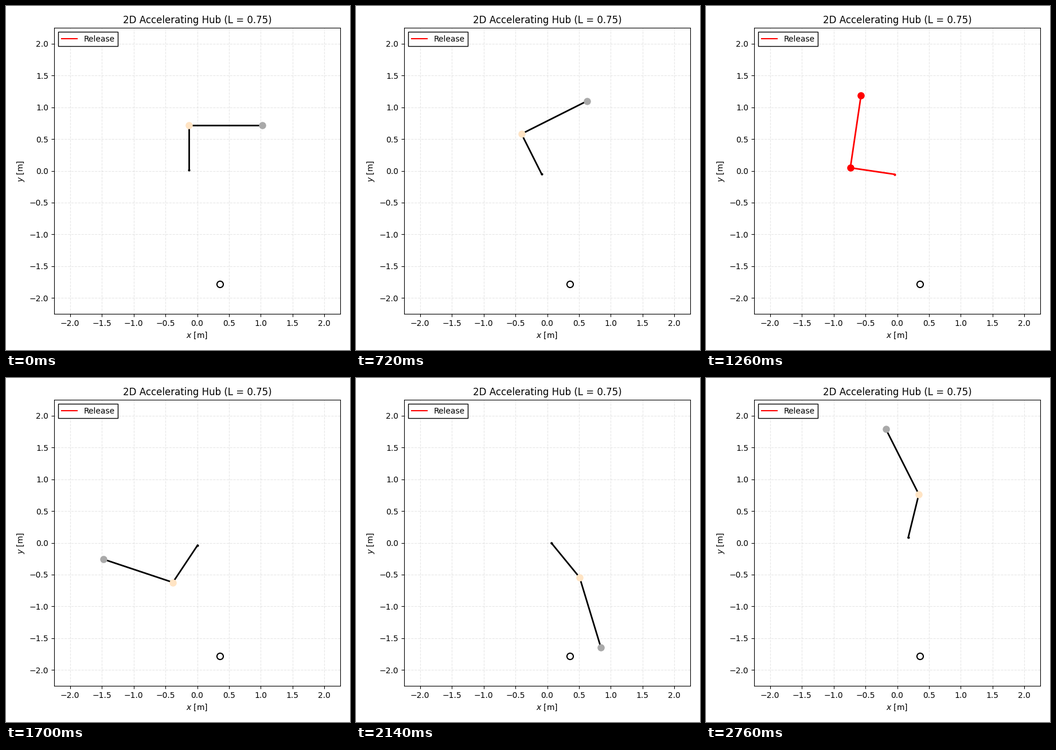
Write a matplotlib script that moves like this. It is 600 px wide and 600 px high and loops after 2780 ms.

```python
import numpy as np
import matplotlib.pyplot as plt
from matplotlib.animation import FuncAnimation

FRAMES, STEP = 139, 20      # 2780 ms loop
ARM, CLUB = 0.701, 1.153    # segment lengths [m]
RELEASE = 1.26              # wrist release time [s]
ACCEL = 51.4                # arm swings as ACCEL * t^2 [deg]


def polar(length, degrees):
    a = np.radians(degrees)
    return length * np.array([np.cos(a), np.sin(a)])


def swing(t):
    """Hub, hand and club head positions at time t."""
    hub = np.array([-0.131 + 0.043 * t + 0.018 * t**2 + 0.0023 * t**3,
                    0.0135 - 0.120 * t + 0.0525 * t**2])
    # Once released, the wrist unfolds and holds the arm back
    u = max(t - RELEASE, 0)
    wrist = u**2 * (21.5 + 200.3 * u - 178.8 * u**2 + 41 * u**3)
    drag = wrist * (0.038 + 0.257 * u - 0.034 * u**2)
    arm = ACCEL * t**2 - drag
    hand = hub + polar(ARM, arm + 90)
    return hub, hand, hand + polar(CLUB, arm + wrist)


fig = plt.figure(figsize=(6, 6), dpi=100)
ax = fig.add_axes([84 / 600, 63 / 600, 499 / 600, 499 / 600])
ticks = np.arange(-2, 2.1, 0.5)
ax.set(xlim=(-2.25, 2.25), ylim=(-2.25, 2.25), xticks=ticks, yticks=ticks,
       xlabel="$x$ [m]", ylabel="$y$ [m]", title="2D Accelerating Hub (L = 0.75)")
ax.grid(ls="--", alpha=0.3)
ax.set_axisbelow(True)

ax.plot(0.358, -1.785, "o", ms=8, mfc="white", mec="black", mew=1.5)
links, = ax.plot([], [], lw=2)
dots = [ax.plot([], [], "o", ms=size)[0] for size in (2, 8, 8)]
key, = ax.plot([], [], color="red", label="Release")
ax.legend(handles=[key], loc="upper left", fancybox=False, framealpha=1, edgecolor="black")


def update(i):
    t = i * STEP / 1000
    points = swing(t)
    released = abs(t - RELEASE) < 1e-6
    links.set_data(*zip(*points))
    links.set_color("red" if released else "black")
    for dot, (x, y), color in zip(dots, points, ("black", "bisque", "darkgray")):
        dot.set_data([x], [y])
        dot.set_color("red" if released else color)
    return links, *dots


anim = FuncAnimation(fig, update, frames=FRAMES, interval=STEP, repeat=True, repeat_delay=0)
plt.show()
```
